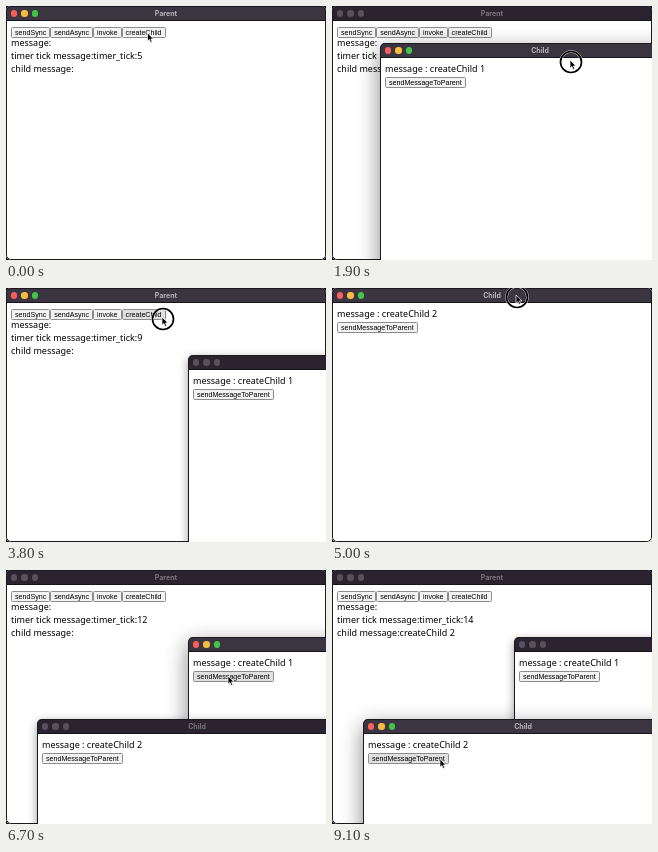
These frames come from a looping animation (320 px wide and 254 px high, 9.6 s). An HTML page:

```html
<!DOCTYPE html>
<html lang="en">
<head>
<meta charset="utf-8">
<title>Parent and child windows</title>
<style>
html, body { margin: 0; width: 100%; height: 100%; overflow: hidden; background: #000; }
#stage { position: relative; width: 320px; height: 254px; overflow: hidden; }
.win {
  position: absolute; left: 0; top: 0; width: 320px; height: 254px;
  border-radius: 5px; overflow: hidden; background: #fff;
  box-shadow: 0 3px 10px rgba(0,0,0,.4);
  font: 9px/13px "Noto Sans", "Open Sans", sans-serif; color: #000;
}
.win.active { box-shadow: 0 7px 22px rgba(0,0,0,.48); }
.win::after {
  content: ""; position: absolute; inset: 0; border-radius: 5px;
  border: 1px solid #1c181f; pointer-events: none;
}
.bar {
  position: absolute; left: 0; top: 0; width: 320px; height: 15px; box-sizing: border-box;
  background: #2b2430; border-bottom: 1px solid #17131a; box-shadow: inset 0 1px #5b5660;
  text-align: center; font: 700 7px/15.5px Inter, sans-serif; color: #79747d;
}
.active .bar { background: #3a3540; color: #b9b5bc; }
.bar i { position: absolute; top: 4.3px; width: 6.4px; height: 6.4px; border-radius: 50%; background: #56515b; }
.bar i:nth-of-type(1) { left: 4.8px; }
.bar i:nth-of-type(2) { left: 15.3px; }
.bar i:nth-of-type(3) { left: 25.8px; }
.active i:nth-of-type(1) { background: #fa5f5c; }
.active i:nth-of-type(2) { background: #f6bd3e; }
.active i:nth-of-type(3) { background: #45c545; }
.text { position: absolute; left: 5px; top: 19px; white-space: pre; }
#parent .text { top: 31.4px; line-height: 12.75px; }
.row { position: absolute; left: 5px; top: 33.5px; display: flex; }
#parent .row { top: 21.3px; }
button {
  box-sizing: border-box; height: 11px; margin: 0; padding: 0 3px;
  border: 1px solid #8c8c8c; border-radius: 1.5px; background: #f3f3f3; color: #000;
  font: 7.11px/10px "Liberation Sans", Arial, sans-serif; white-space: nowrap;
}
button.lit { background: #e0e0e0; }
#cursor { position: absolute; left: 0; top: 0; width: 30px; height: 30px; overflow: visible; }
</style>
</head>
<body>
<div id="stage">
  <div class="win" id="parent">
    <div class="bar"><i></i><i></i><i></i><span>Parent</span></div>
    <div class="row">
      <button>sendSync</button><button>sendAsync</button><button>invoke</button><button id="create">createChild</button>
    </div>
    <div class="text" id="log"></div>
  </div>
  <svg id="cursor">
    <g id="ring" fill="none">
      <circle cx="1" cy="2" r="10.5" stroke="#fff" stroke-opacity=".8" stroke-width="2.6"/>
      <circle cx="1" cy="2" r="10.5" stroke="#000" stroke-width="1.7"/>
    </g>
    <path d="M0 0V8.2L1.9 6.5L3.2 9.4L4.7 8.7L3.4 5.9H6Z" fill="#000" stroke="#fff" stroke-width=".7"/>
  </svg>
</div>
<script>
const LOOP = 9600, STEP = 100;
const $ = id => document.getElementById(id);
const during = (t, from, to) => t >= from && t < to;

const smooth = p => p * p * (3 - 2 * p);
const speedUp = p => p * p;
const fling = p => 1 - (1 - p) ** 10;

// A move is [from, to, x, y, ease]; each one starts where the last ended.
function at(moves, t, [x, y] = [0, 0]) {
  for (const [from, to, endX, endY, ease = smooth] of moves) {
    const k = ease(Math.min(1, Math.max(0, (t - from) / (to - from))));
    x += (endX - x) * k;
    y += (endY - y) * k;
  }
  return [x, y];
}
const shift = (moves, dx, dy) => moves.map(([from, to, x, y, ease]) => [from, to, x + dx, y + dy, ease]);

const children = [
  { id: 1, born: 400, moves: [[1600, 1900, 48, 37, speedUp], [1900, 2700, 175, 90, fling], [2700, 3000, 182, 67]] },
  { id: 2, born: 4200, moves: [[5000, 5450, 31, 149]] }
];

// The cursor rides along with each dragged window.
const cursorMoves = [
  [1000, 1500, 190, 17], ...shift(children[0].moves, 190, 17),
  [3100, 3600, 156, 29],
  [4500, 4900, 184, 7], ...shift(children[1].moves, 184, 7),
  [5700, 6400, 222, 106],
  [7700, 8200, 108, 189]
];

for (const c of children) {
  c.el = document.createElement("div");
  c.el.className = "win";
  c.el.innerHTML = `<div class="bar"><i></i><i></i><i></i><span></span></div>
    <div class="body"><div class="text">message : createChild ${c.id}</div>
    <div class="row"><button>sendMessageToParent</button></div></div>`;
  c.title = c.el.querySelector("span");
  c.body = c.el.querySelector(".body");
  c.button = c.el.querySelector("button");
  $("stage").insertBefore(c.el, $("cursor"));
}

// Which window has the focus: 0 is the parent, -1 is none.
const focusAt = t =>
  t < 200 ? 0 : t < 400 ? -1 : t < 3700 ? 1 : t < 4100 ? 0 :
  t < 4200 ? -1 : t < 6500 ? 2 : t < 8400 ? 1 : 2;

const isPressed = t =>
  [100, 7000, 9000].some(click => during(t, click, click + 100)) ||
  [3700, 6400, 8200].some(click => during(t, click, click + 200)) ||
  during(t, 1600, 2500) || during(t, 4900, 5700);

function draw(t) {
  const focus = focusAt(t);
  const ticks = 5 + Math.floor((t + 300) / 1000);
  const reply = t >= 9100 ? "createChild 2" : t >= 7100 ? "createChild 1" : "";
  $("parent").classList.toggle("active", focus === 0);
  $("log").textContent = `message:\ntimer tick message:timer_tick:${ticks}\nchild message:${reply}`;
  $("create").classList.toggle("lit", focus === 0 && isPressed(t));

  for (const c of children) {
    const age = t - c.born, [x, y] = at(c.moves, t);
    c.el.style.opacity = age < 0 ? 0 : age < STEP ? .6 : 1;
    c.el.style.transform = `translate(${x}px,${y}px)`;
    c.el.classList.toggle("active", focus === c.id);
    c.title.textContent = age < 300 ? "Electron" : "Child";
    c.body.style.visibility = age < 500 ? "hidden" : "visible";
  }
  children[0].button.classList.toggle("lit", during(t, 6500, 7800));
  children[1].button.classList.toggle("lit", t >= 8400);

  const [x, y] = at(cursorMoves, t, [141.5, 27]);
  $("cursor").style.transform = `translate(${x}px,${y}px)`;
  $("ring").style.display = isPressed(t) ? "" : "none";
}

const start = performance.now();
function frame() {
  const t = (performance.now() - start) % LOOP;
  draw(Math.floor(t / STEP) * STEP);
  requestAnimationFrame(frame);
}
frame();
</script>
</body>
</html>
```
